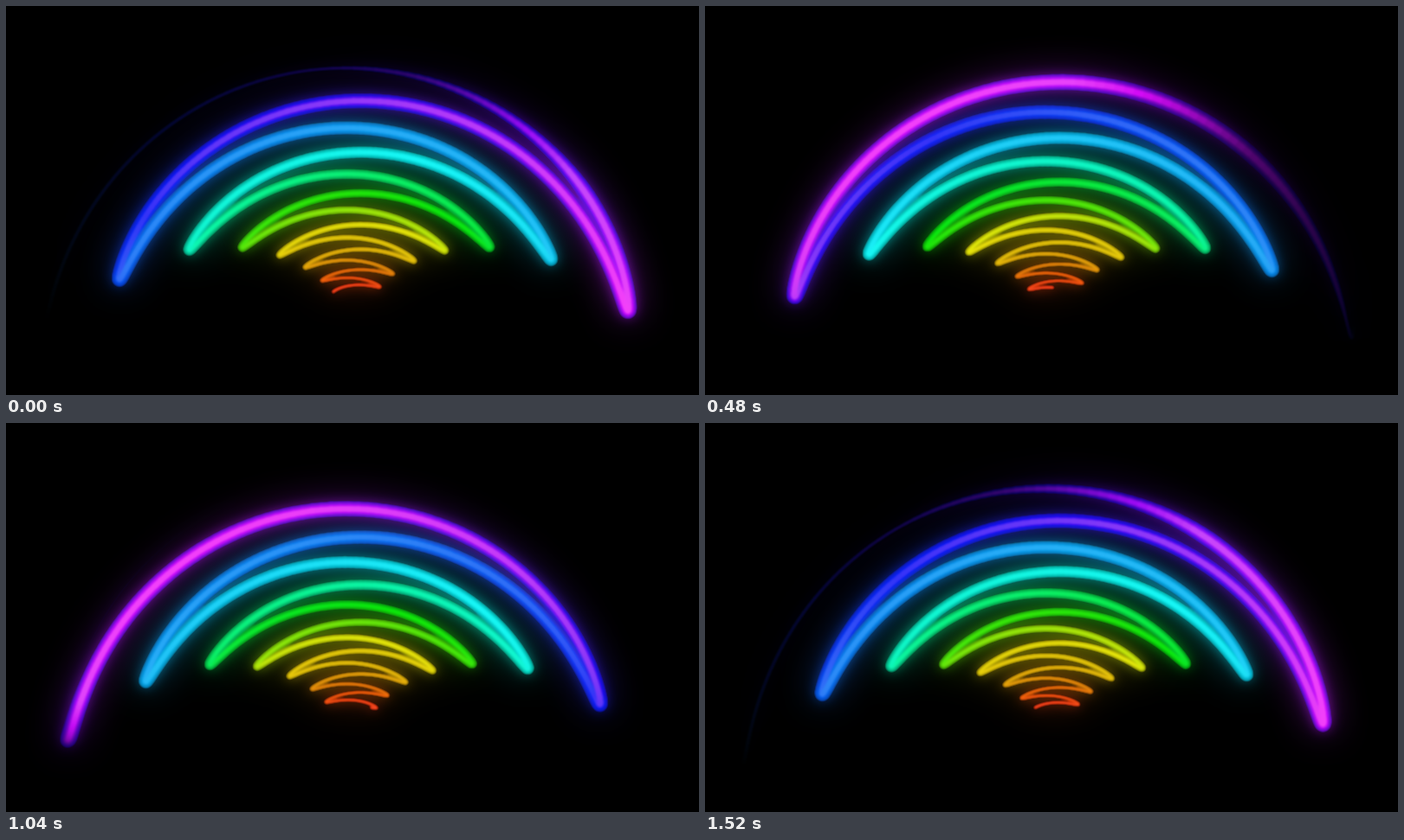
Animation of 800x450 px, one loop 1600 ms. Source, as an HTML page with a canvas:

```html
<!DOCTYPE html>
<html lang="en">
<head>
<meta charset="utf-8">
<title>Neon pendulum</title>
<style>
  html, body { margin: 0; width: 100%; height: 100%; overflow: hidden; background: #000; }
  canvas { display: block; width: 800px; height: 450px; }
</style>
</head>
<body>
<canvas id="stage" width="800" height="450"></canvas>
<script>
const LOOP = 1600, STEP = 80;
const FIRST = 0.55, LAST = 7.46;

// Values at ages 0..8, one age unit being a full swing.
const REACH = [19, 30, 45, 69.5, 105, 156.5, 227.5, 316, 413];
const END_Y = [338, 325, 310, 295, 283, 279, 293, 352, 470];
const TOP_Y = [333, 319, 300, 275, 245, 206, 155.5, 92, 5];
// Hue at every half age.
const HUE = [8, 10, 14, 22, 32, 42, 50, 54, 66, 100, 128, 165, 190, 222, 298, 200];
// Brightness by age past the fading edge.
const FADE = [[-0.04, 1], [0, 0.72], [0.04, 0.36], [0.08, 0.25], [0.14, 0.17], [0.25, 0]];

const ctx = document.getElementById('stage').getContext('2d');
const layer = document.createElement('canvas');
layer.width = 800;
layer.height = 450;
const pen = layer.getContext('2d');

const clamp = (v, lo, hi) => Math.min(hi, Math.max(lo, v));

function spline(tab, x) {
  const i = clamp(Math.floor(x), 0, tab.length - 2), u = x - i;
  const p = tab[i], q = tab[i + 1];
  const o = i ? tab[i - 1] : 2 * p - q;
  const r = i + 2 < tab.length ? tab[i + 2] : 2 * q - p;
  return p + 0.5 * u * (q - o + u * (2 * o - 5 * p + 4 * q - r + u * (3 * (p - q) + r - o)));
}

// The edge of the fade sways twice per swing.
function fade(age, turn) {
  const x = age - 7.14 - 0.05 * Math.cos(4 * Math.PI * turn);
  if (x <= FADE[0][0]) return 1;
  for (let i = 1; i < FADE.length; i++) {
    const [a, p] = FADE[i - 1], [b, q] = FADE[i];
    if (x <= b) return p + (q - p) * (x - a) / (b - a);
  }
  return 0;
}

// An inverted pendulum whose circle passes through both ends and the top.
function place(age, turn) {
  const reach = spline(REACH, age), top = spline(TOP_Y, age);
  const drop = spline(END_Y, age) - top;
  const radius = (reach * reach + drop * drop) / (2 * drop);
  const angle = 2 * Math.atan(drop / reach) * Math.cos(2 * Math.PI * (age - turn));
  return [401.5 + radius * Math.sin(angle), top + radius * (1 - Math.cos(angle))];
}

function look(age, turn) {
  const hue = spline(HUE, age * 2);
  const thin = 1 - 0.8 * clamp((age - 7.14) / 0.12, 0, 1);
  const core = age > 5 ? 47 + (age - 5) * 7 : 47 + Math.max(0, 2 - age) * 6;
  return {
    edgeHue: hue - clamp((hue - 225) * 0.6, 0, 25),
    hue, core,
    light: fade(age, turn),
    width: (4 + 0.31 * age * age) * thin
  };
}

function buildPath(turn) {
  const path = [];
  for (let age = FIRST; age < LAST; age += 0.004) {
    path.push({ at: place(age, turn), ...look(age, turn) });
  }
  return path;
}

function trace(path, scale, color) {
  for (let i = 1; i < path.length; i++) {
    const p = path[i];
    pen.strokeStyle = color(p);
    pen.lineWidth = p.width * scale;
    pen.beginPath();
    pen.moveTo(...path[i - 1].at);
    pen.lineTo(...p.at);
    pen.stroke();
  }
}

const hsl = (h, s, l) => `hsl(${h.toFixed(1)} ${s}% ${l.toFixed(1)}%)`;

function glow(blur, alpha) {
  ctx.filter = `blur(${blur}px)`;
  ctx.globalAlpha = alpha;
  ctx.drawImage(layer, 0, 0);
}

function draw(time) {
  const path = buildPath(time / LOOP);

  pen.globalCompositeOperation = 'source-over';
  pen.fillStyle = '#000';
  pen.fillRect(0, 0, 800, 450);
  pen.globalCompositeOperation = 'lighten';
  pen.lineCap = 'round';
  trace(path, 1, p => hsl(p.edgeHue, 100, p.core * 0.66 * p.light));
  trace(path, 0.64, p => hsl((p.hue + p.edgeHue) / 2, 95, p.core * 0.82 * p.light));
  trace(path, 0.36, p => hsl(p.hue, 92, p.core * p.light));

  ctx.globalCompositeOperation = 'source-over';
  ctx.filter = 'none';
  ctx.globalAlpha = 1;
  ctx.fillStyle = '#000';
  ctx.fillRect(0, 0, 800, 450);
  ctx.globalCompositeOperation = 'lighter';
  glow(20, 0.42);
  glow(7, 0.42);
  ctx.globalCompositeOperation = 'lighten';
  glow(0.9, 1);
}

let shown = -1;
function tick() {
  const step = Math.floor(performance.now() % LOOP / STEP);
  if (step !== shown) {
    shown = step;
    draw(step * STEP);
  }
  requestAnimationFrame(tick);
}
tick();
</script>
</body>
</html>
```
